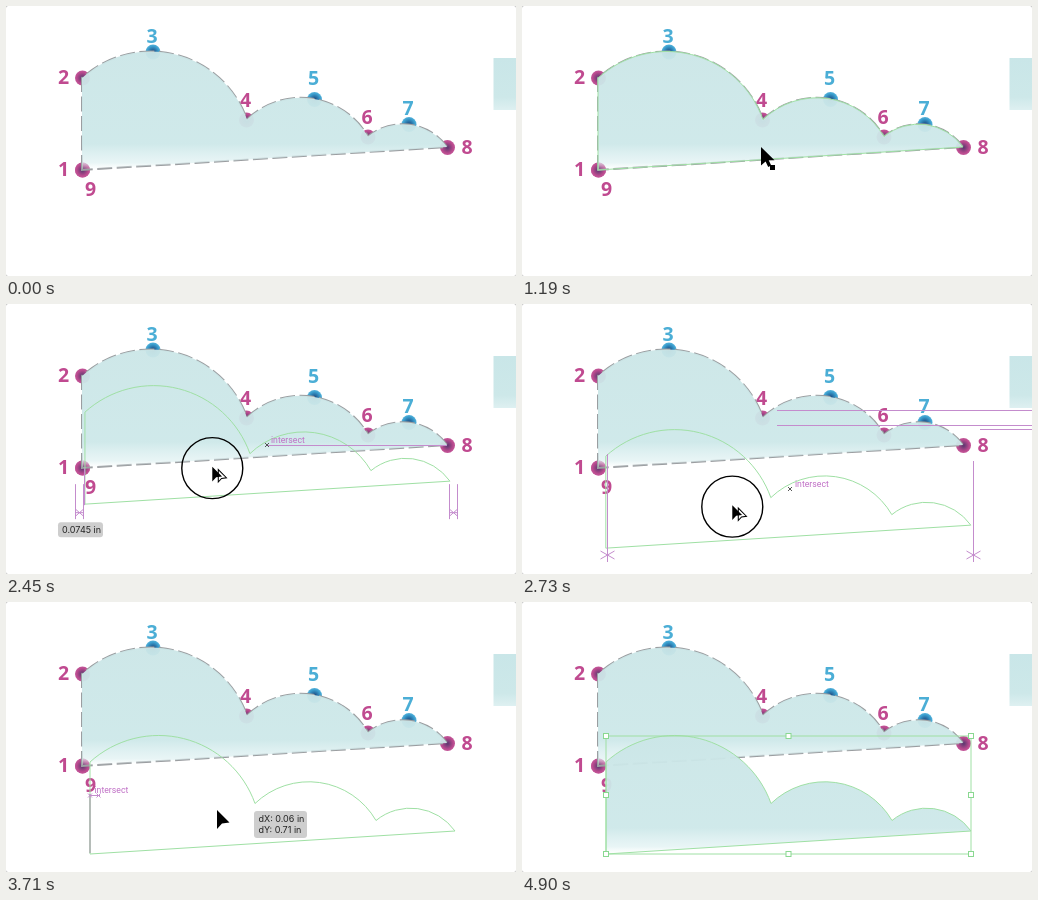
Write an HTML page that moves like this. It is 510x270 px and loops after 5040 ms.

```html
<!DOCTYPE html>
<html lang="en">
<head>
<meta charset="utf-8">
<title>Copying a shape by dragging</title>
<style>
  html, body { margin: 0; width: 100%; height: 100%; overflow: hidden; background: #c4c4c4; }
  svg { display: block; width: 510px; height: 270px; }
  .num { font: 700 19.5px "Open Sans", "Noto Sans", sans-serif; text-anchor: middle; }
  .tip { font: 9px Inter, Roboto, sans-serif; fill: #222; }
  .hint { font: 8.7px Roboto, Inter, sans-serif; fill: #c070c6; }
  .guide { fill: none; stroke: #c48ccd; }
  .cross { fill: none; stroke: #444; stroke-width: .9; }
  .green { fill: none; stroke: #9fe0a4; }
  .handle { fill: #fff; stroke: #8ad891; }
  .box { fill: #cecece; }
</style>
</head>
<body>
<svg viewBox="0 0 510 270">
  <defs>
    <linearGradient id="mist" gradientUnits="userSpaceOnUse" x1="0" y1="45" x2="0" y2="164">
      <stop offset="0" stop-color="#cbe6e7" stop-opacity=".95"/>
      <stop offset=".78" stop-color="#cde8e9" stop-opacity=".95"/>
      <stop offset=".94" stop-color="#dff1f2" stop-opacity=".7"/>
      <stop offset="1" stop-color="#eef8f8" stop-opacity="0"/>
    </linearGradient>
    <linearGradient id="swatch" x2="0" y2="1">
      <stop offset="0" stop-color="#c9e6e8"/>
      <stop offset=".75" stop-color="#cde8e9"/>
      <stop offset="1" stop-color="#def0f1"/>
    </linearGradient>
    <radialGradient id="pink">
      <stop offset=".1" stop-color="#643a72"/>
      <stop offset=".75" stop-color="#b94a8e"/>
      <stop offset="1" stop-color="#c4589a"/>
    </radialGradient>
    <radialGradient id="blue">
      <stop offset=".1" stop-color="#1d4f86"/>
      <stop offset=".75" stop-color="#3a9dcd"/>
      <stop offset="1" stop-color="#55b2da"/>
    </radialGradient>
    <path id="cloud" d="M76 164V72A102.2 102.2 0 0 1 241 113.5A77.6 77.6 0 0 1 362 130.5A54.6 54.6 0 0 1 441 141Z"/>
    <path id="arrow" d="M0 0V18.5L4.6 14.6L7.2 20L10.2 18.6L7.7 13.3H13.5Z"/>
    <path id="head" d="M0 0V19L5 13.5L12.5 12.5Z"/>
    <path id="x" d="M-2-2L2 2M-2 2L2-2"/>
    <path id="gap" d="M0 180V215M8 180V215M0 205L8 212M0 212L8 205M0 208.5H8"/>
    <path id="star" d="M0-7V7M-7-4L7 4M-7 4L7-4"/>
  </defs>

  <rect width="510" height="270" rx="2.5" fill="#fff"/>
  <rect x="487.5" y="52" width="23" height="52" fill="url(#swatch)"/>
  <g id="dots"></g>
  <use href="#cloud" fill="none" stroke="#9b9ea1" stroke-width="2" stroke-dasharray="15 4.5"/>
  <use href="#cloud" fill="url(#mist)"/>
  <use id="hover" href="#cloud" class="green"/>

  <g id="copy" transform="translate(8 88)">
    <use href="#cloud" fill="url(#mist)"/>
    <use href="#cloud" class="green"/>
    <g id="frame"></g>
  </g>
  <use id="ghost" href="#cloud" class="green"/>

  <g id="spacing">
    <use href="#gap" x="69.5" class="guide"/>
    <use href="#gap" x="443.5" class="guide"/>
    <path class="guide" d="M78.5 164V201"/>
    <rect class="box" x="52" y="218" width="45" height="15" rx="3"/>
    <text class="tip" x="56" y="229">0.0745 in</text>
  </g>
  <g id="level">
    <path class="guide" d="M261 141.5H441"/>
    <use href="#x" x="261" y="141" class="cross"/>
    <text class="hint" x="265" y="139">intersect</text>
  </g>
  <g id="lines">
    <path class="guide" d="M255 106.5H510M255 121.5H510M458 125.5H510M85.5 150V251M451.5 157V251"/>
    <use href="#star" x="85.5" y="251" class="guide"/>
    <use href="#star" x="451.5" y="251" class="guide"/>
    <use href="#x" x="268" y="185" class="cross"/>
    <text class="hint" x="273" y="183">intersect</text>
  </g>
  <g id="drop">
    <path d="M84 192V251" stroke="#9b8a9f"/>
    <path class="guide" d="M84 193.5H94"/>
    <use href="#x" x="84" y="193.5" class="guide"/>
    <use href="#x" x="92.5" y="193.5" class="guide"/>
    <text class="hint" x="88.5" y="191">intersect</text>
    <rect class="box" x="248" y="209" width="53" height="27" rx="3"/>
    <text class="tip" x="252.5" y="220">dX: 0.06 in</text>
    <text class="tip" x="252.5" y="230.5">dY: 0.71 in</text>
  </g>

  <g id="pointer">
    <circle id="ring" cy="1.5" r="30.5" fill="none" stroke="#000" stroke-width="1.4"/>
    <g id="plain">
      <use href="#arrow"/>
      <rect id="badge" x="9" y="18" width="5" height="5"/>
    </g>
    <g id="double">
      <use href="#head" transform="translate(6 3) scale(.65)" fill="#fff" stroke="#000" stroke-width="1.6"/>
      <use href="#head" transform="scale(.78)"/>
    </g>
    <use id="single" href="#head"/>
  </g>
</svg>
<script>
const LOOP = 5040, STEP = 70;
const el = id => document.getElementById(id);

const knots = [[76.5, 164], [76.5, 72], [147, 46], [240.5, 114], [308.5, 93.5],
  [362, 131], [403, 118.5], [441.5, 141.5], [76.5, 164]];

// numbers stand beside the side knots and arch above the top ones
function labelShift(i) {
  if (i < 2) return [-19, 0];
  if (i === 7) return [19.5, 0];
  if (i === 8) return [8, 20];
  return [-1, 1.3 * (i - 4) ** 2 - 21];
}

el("dots").innerHTML = knots.map(([x, y], i) => {
  const [dx, dy] = labelShift(i), crest = i > 1 && i < 7 && i % 2 === 0;
  return `<circle cx="${x}" cy="${y}" r="7.5" fill="url(#${crest ? "blue" : "pink"})"/>
    <text class="num" x="${x + dx}" y="${y + dy + 6.3}" fill="${crest ? "#4baed6" : "#c04a90"}">${i + 1}</text>`;
}).join("");

// selection frame with eight handles
let frame = `<rect class="green" x="76" y="46" width="365" height="118"/>`;
for (let n = 0; n < 9; n++) {
  const x = 76 + n % 3 * 182.5, y = 46 + Math.floor(n / 3) * 59;
  if (n !== 4) frame += `<rect class="handle" x="${x - 2.5}" y="${y - 2.5}" width="5" height="5"/>`;
}
el("frame").innerHTML = frame;

const linear = k => k;
const easeOut = k => 1 - (1 - k) ** 2;
const smooth = k => k * k * (3 - 2 * k);
const progress = (t, from, to) => Math.min(1, Math.max(0, (t - from) / (to - from)));

const DRAG = [2220, 2780];
const legs = [
  { from: 910, to: 1190, x: 239, y: 141, ease: easeOut },
  { from: 1820, to: 2030, x: 200, y: 121, ease: linear },
  { from: 2030, to: DRAG[0], x: 203, y: 131, ease: linear },
  { from: DRAG[0], to: DRAG[1], x: 211, y: 208, ease: linear },
  { from: 4340, to: 4550, x: 236, y: 275, ease: linear }
];

function pointerAt(t) {
  let x = 482, y = 262;
  for (const leg of legs) {
    const k = leg.ease(progress(t, leg.from, leg.to));
    x += (leg.x - x) * k;
    y += (leg.y - y) * k;
  }
  return [x, y];
}

const spans = {
  hover: [1120, 2240], ghost: [2240, 3780], copy: [3780, LOOP],
  spacing: [2380, 2730], level: [2450, 2520], lines: [2730, 2800], drop: [2940, 3780],
  pointer: [910, 4550], ring: [2170, 3640], badge: [1120, 2240],
  plain: [910, 2240], double: [2240, 3710], single: [3710, 4550]
};

const move = (id, x, y) => el(id).setAttribute("transform", `translate(${x} ${y})`);

function draw(now) {
  const t = Math.floor(now % LOOP / STEP) * STEP;
  for (const [id, [from, until]] of Object.entries(spans))
    el(id).style.display = t >= from && t < until ? "" : "none";
  const k = progress(t, ...DRAG);
  move("pointer", ...pointerAt(t));
  move("ghost", 8 * smooth(k), 88 * k);
  move("spacing", 0, 88 * k - 36);
}

const start = performance.now();
function tick() {
  draw(performance.now() - start);
  requestAnimationFrame(tick);
}
tick();
</script>
</body>
</html>
```
